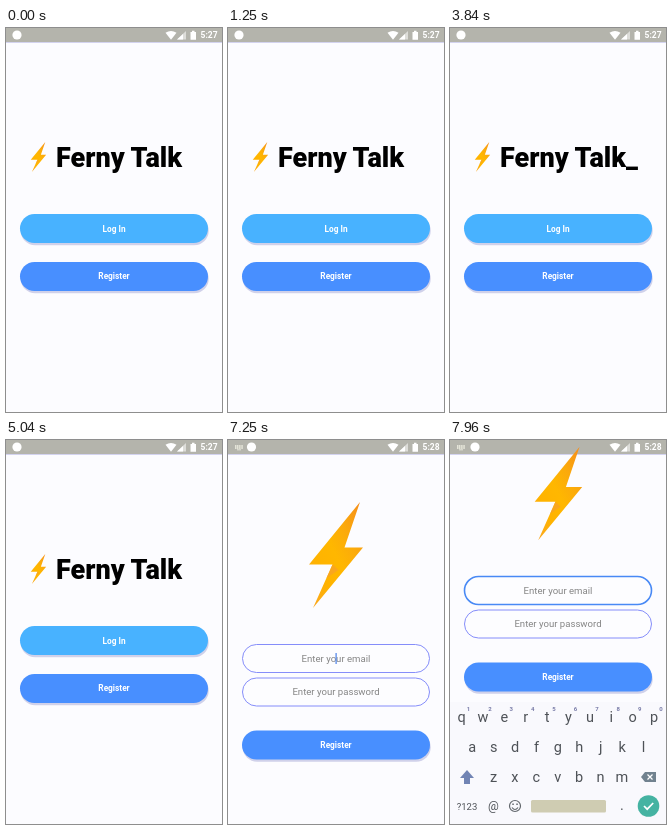
Write an HTML page that moves like this. It is 216 px wide and 384 px high and loops after 8000 ms.

```html
<!DOCTYPE html>
<html lang="en">
<head>
<meta charset="utf-8">
<title>Chat sign-up</title>
<style>
html, body { margin: 0; width: 100%; height: 100%; overflow: hidden; background: #fcfcff; }
svg { display: block; width: 100vw; height: 100vh; font-family: Roboto, sans-serif; }
.label { font-size: 8.3px; font-weight: 600; fill: #fff; text-anchor: middle; }
.hint { font-size: 9.6px; fill: #858585; text-anchor: middle; }
.key { font-size: 14.5px; fill: #4e5257; text-anchor: middle; }
.digit { font-size: 6px; font-weight: 700; fill: #777aa6; text-anchor: middle; }
.field { fill: #fdfdff; stroke: #858dfa; }
</style>
</head>
<body>
<svg viewBox="0 0 216 384">
  <defs>
    <linearGradient id="gold" x1="1" y1="0" x2="0" y2="1">
      <stop offset="0" stop-color="#f58a1c"/>
      <stop offset=".28" stop-color="#fba90c"/>
      <stop offset=".5" stop-color="#ffb700"/>
      <stop offset=".72" stop-color="#ffb300"/>
      <stop offset="1" stop-color="#f9a528"/>
    </linearGradient>
    <g id="bolt">
      <path d="M24.5-53L-26.5 9.500H-3L-22.500 53 27.500-7.500H9Z" fill="url(#gold)"/>
      <path d="M-3 9.500L-9 23 3 15Z" fill="#f6a02c" opacity=".7"/>
    </g>
    <g id="pill">
      <rect x="14.7" y="2.2" width="188" height="29" rx="14.5" fill="#d0d1ea"/>
      <rect x="14" width="188" height="29" rx="14.5" fill="currentColor"/>
    </g>
  </defs>
  <rect width="216" height="384" fill="#fcfcff"/>

  <g id="welcome">
    <use href="#bolt" transform="translate(32.3 129) scale(.285)"/>
    <text id="title" x="50" y="139" font-size="27" font-weight="900"></text>
    <use href="#pill" y="186" color="#48b2ff"/>
    <text class="label" x="108" y="203.6">Log In</text>
    <use href="#pill" y="234" color="#488fff"/>
    <text class="label" x="108" y="251.2">Register</text>
  </g>

  <g id="signup">
    <g id="form">
      <rect id="email" class="field" x="14.5" y="204.5" width="187" height="28" rx="14"/>
      <text class="hint" x="108" y="221.5">Enter your email</text>
      <rect id="caret" x="107.5" y="213" width="1.2" height="11" fill="#4a80e8"/>
      <rect class="field" x="14.5" y="238" width="187" height="28" rx="14"/>
      <text class="hint" x="108" y="255">Enter your password</text>
      <use href="#pill" y="290.5" color="#488fff"/>
      <text class="label" x="108" y="307.7">Register</text>
    </g>
    <g id="keys">
      <rect y="262" width="216" height="124" fill="#f9f9fd"/>
      <path d="M17 330l7 8h-4v6h-6v-6h-4z" fill="#7184b4"/>
      <path d="M191 337l4-5h11v10h-11z" fill="#71828f"/>
      <path d="M197.5 334.5l5 5m0-5l-5 5" stroke="#fff" stroke-width="1.2"/>
      <g fill="none" stroke="#62676c" stroke-width="1.2">
        <circle cx="65" cy="366" r="5.5"/>
        <path d="M62 367.5q3 4 6 0"/>
      </g>
      <path d="M62.3 363.5h1.5v1.5h-1.5zm4 0h1.5v1.5h-1.5z" fill="#62676c"/>
      <rect x="81" y="360" width="75" height="12.5" rx="1.5" fill="#cfccb2"/>
      <circle cx="198.5" cy="366" r="10.8" fill="#45b3a2"/>
      <path d="M194 366l3.2 3.2 6-6.2" fill="none" stroke="#fff" stroke-width="1.7"/>
    </g>
  </g>

  <rect width="216" height="14" fill="#b4b4ac"/>
  <rect y="14" width="216" height="1" fill="#d3d3ef"/>
  <g id="ime" fill="none" stroke="#f3f3e6">
    <path d="M7 6h8M7 8h8" stroke-width="1.4" stroke-dasharray="1.3 .5"/>
    <path d="M9 9.8h4" stroke-width=".8"/>
  </g>
  <circle id="notice" cy="7" r="4.6" fill="#fff"/>
  <g fill="#fff">
    <path d="M159.5 4.700q5.500-3.500 11 0l-5.500 7z"/>
    <path d="M180 3v8.500h-9z" opacity=".55"/>
    <path d="M177 6v5.500h-6z"/>
    <path d="M184.500 4h1.500v-1.200h2.500v1.200h1.500v7.700h-5.500z"/>
    <text id="clock" x="194.5" y="10.2" font-size="8.5" font-weight="600"></text>
  </g>
  <use id="hero" href="#bolt"/>
</svg>
<script>
const LOOP = 8000, STEP = 500 / 3;
const NAME = "Ferny Talk";
const $ = id => document.getElementById(id);
const set = (id, attrs) => {
  for (const k in attrs) $(id).setAttribute(k, attrs[k]);
};
const show = (id, on) => set(id, { display: on ? "inline" : "none" });
const mix = (a, b, p) => a + (b - a) * p;
const clamp = p => Math.min(1, Math.max(0, p));

function addText(text, x, y, cls, size) {
  const el = document.createElementNS("http://www.w3.org/2000/svg", "text");
  el.textContent = text;
  el.setAttribute("x", x);
  el.setAttribute("y", y);
  el.setAttribute("class", cls);
  if (size) el.style.fontSize = size + "px";
  $("keys").append(el);
}

function buildKeys() {
  const rows = [["qwertyuiop", 11.5, 282], ["asdfghjkl", 22.3, 312], ["zxcvbnm", 43.5, 342]];
  for (const [letters, x, y] of rows)
    [...letters].forEach((c, i) => addText(c, x + i * 21.4, y, "key"));
  [..."1234567890"].forEach((c, i) => addText(c, 18.5 + i * 21.4, 271, "digit"));
  addText("?123", 17, 369.5, "key", 9.5);
  addText("@", 43.5, 370, "key", 12);
  addText(".", 172, 370, "key");
}

// Typed part of the name, followed by a blinking underscore.
function typed(t) {
  if (t < 1300) return NAME;
  if (t < 1667) return "";
  if (t < 5840) {
    const n = 1 + Math.floor((t - 1667) / STEP + 0.02);
    const extra = n - NAME.length;
    const lit = extra <= 0 || (extra < 8 && extra % 2 === 0);
    return NAME.slice(0, n) + (lit ? "_" : "");
  }
  return t < 6210 ? "" : NAME[0] + "_";
}

function draw(t) {
  const signup = t >= 6340;
  const p = 1 - (1 - clamp((t - 7340) / 290)) ** 3;
  const focus = clamp((t - 7340) / 200);
  const ime = t >= 6880;

  show("welcome", !signup);
  show("signup", signup);
  show("hero", signup);
  $("title").textContent = typed(t);
  $("clock").textContent = t < 5500 ? "5:27" : "5:28";

  show("ime", ime);
  set("notice", { cx: ime ? mix(23.5, 25, p) : 11 });
  set("hero", {
    transform: `translate(${mix(107.5, 108, p)} ${mix(115, 53.5, p)}) scale(${mix(1, 0.88, p)})`
  });
  set("form", { transform: `translate(0 ${-68 * p})` });
  set("keys", { transform: `translate(0 ${122 * (1 - p)})` });
  set("email", {
    style: `stroke:${focus ? "#4889f5" : "#858dfa"};stroke-width:${mix(1, 1.6, focus)}`
  });
  show("caret", t >= 7180 && t < 7680);
}

buildKeys();
function tick() {
  draw(performance.now() % LOOP);
  requestAnimationFrame(tick);
}
tick();
</script>
</body>
</html>
```
